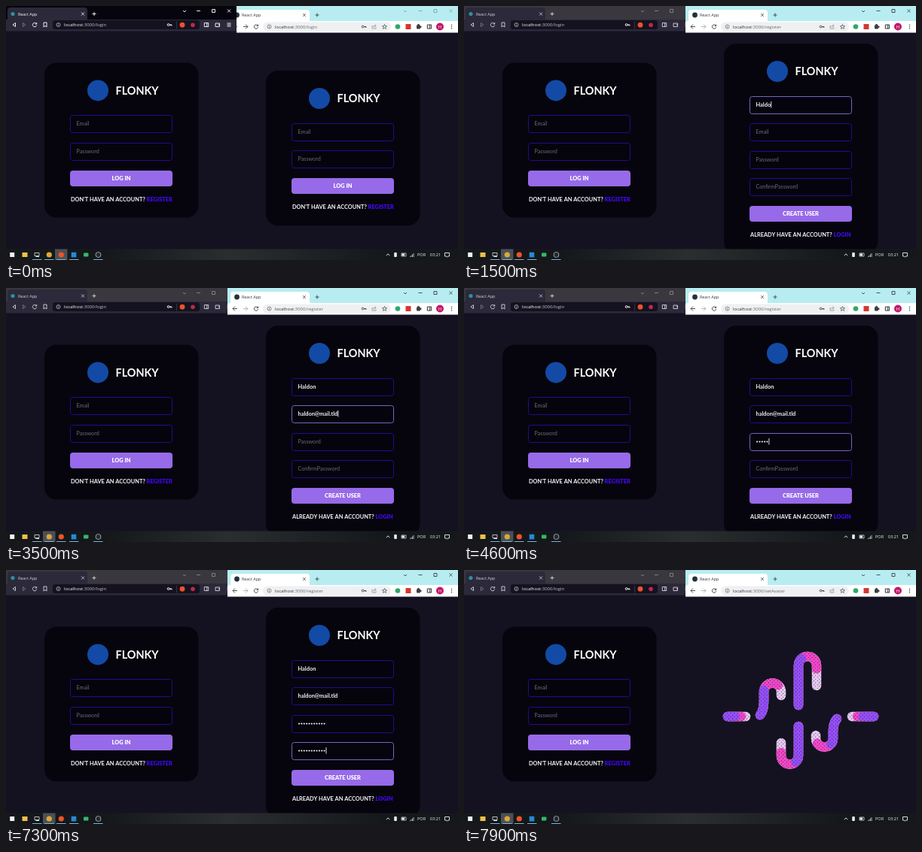
Write an HTML page with a canvas that moves like this. It is 600x338 px and loops after 8000 ms.

```html
<!DOCTYPE html>
<html lang="en">
<head>
<meta charset="utf-8">
<title>Sign up demo</title>
<style>
  html, body { margin: 0; width: 100%; height: 100%; overflow: hidden; background: #141221; }
  canvas { display: block; width: 600px; height: 338px; }
</style>
</head>
<body>
<canvas id="stage"></canvas>
<script>
const W = 600, H = 338, LOOP = 8000;
const canvas = document.getElementById('stage');
const ctx = canvas.getContext('2d');
const dpr = window.devicePixelRatio || 1;
canvas.width = W * dpr;
canvas.height = H * dpr;

const UI = '"Open Sans", "Noto Sans", sans-serif';
const FORM = 'Lato, "Open Sans", sans-serif';
const PAGE = '#141221', CARD = '#06050d', ACCENT = '#966ae8', LINK = '#4208f0', EDGE = '#27098f';
const BRAND = 'FLONKY', USER = 'Haldon', MAIL = 'haldon@mail.tld';

// Moments of the story, in ms
const SWITCH = 200, DONE = 7700;
const FOCUS = [400, 1800, 3900, 5500];

function box(x, y, w, h, fill, r = 0) {
  ctx.fillStyle = fill;
  ctx.beginPath();
  ctx.roundRect(x, y, w, h, r);
  ctx.fill();
}
function frame(x, y, w, h, color, r = 0, lw = 1) {
  ctx.strokeStyle = color;
  ctx.lineWidth = lw;
  ctx.beginPath();
  ctx.roundRect(x, y, w, h, r);
  ctx.stroke();
}
function disc(x, y, r, fill) {
  ctx.fillStyle = fill;
  ctx.beginPath();
  ctx.arc(x, y, r, 0, 7);
  ctx.fill();
}
function text(s, x, y, font, color, align = 'left') {
  ctx.font = font;
  ctx.fillStyle = color;
  ctx.textAlign = align;
  ctx.fillText(s, x, y);
}
// Small line icon, path given around (x, y)
function icon(d, x, y, color, lw = 0.9) {
  ctx.save();
  ctx.translate(x, y);
  ctx.strokeStyle = color;
  ctx.lineWidth = lw;
  ctx.stroke(new Path2D(d));
  ctx.restore();
}

const I = {
  back: 'M3 0H-3M0 -3L-3 0L0 3',
  next: 'M-3 0H3M0 -3L3 0L0 3',
  prevTri: 'M1.5 -2.5L-2 0L1.5 2.5Z',
  nextTri: 'M-1.5 -2.5L2 0L-1.5 2.5Z',
  reload: 'M2.4 -1.3A2.7 2.7 0 1 0 2.7 .6M2.7 -3V-1H.7',
  mark: 'M-2 -3H2V3L0 1.4L-2 3Z',
  info: 'M2.5 0A2.5 2.5 0 1 1 -2.5 0A2.5 2.5 0 1 1 2.5 0M0 -.4V1.5M0 -1.6V-1',
  key: 'M0 0A1.4 1.4 0 1 1 -2.8 0A1.4 1.4 0 1 1 0 0H3V1.4M1.6 0V1.2',
  share: 'M-1 -1H-2.5V2.5H2.5V.5M-.5 1Q-.5 -1.5 2.5 -1.5M1 -3L2.7 -1.5L1 0',
  star: 'M0 -3L.9 -.9L3 -.8L1.4 .6L1.9 2.8L0 1.6L-1.9 2.8L-1.4 .6L-3 -.8L-.9 -.9Z',
  panel: 'M-2.7 -2.5H2.7V2.5H-2.7ZM.7 -2.5V2.5',
  wallet: 'M-3 -2H2.5V2.5H-3ZM.5 0H3',
  menu: 'M-2.5 -2H2.5M-2.5 0H2.5M-2.5 2H2.5',
  plus: 'M-2.5 0H2.5M0 -2.5V2.5',
  cross: 'M-2 -2L2 2M2 -2L-2 2',
  min: 'M-2.5 0H2.5',
  max: 'M-2 -2H2V2H-2Z',
  down: 'M-2 -1L0 1L2 -1',
  up: 'M-2.2 1.2L0 -1.2L2.2 1.2'
};

function typed(s, start, step, t) {
  const n = t < start ? 0 : Math.floor((t - start) / step) + 1;
  return s.slice(0, n);
}

function field(x, y, hint, value, secret, focused) {
  box(x, y, 136, 24, '#05040c', 3);
  frame(x + 0.5, y + 0.5, 135, 23, focused ? '#7c60c4' : EDGE, 3);
  const tx = x + 8.5, base = y + 14;
  let end = tx;
  if (!value) {
    text(hint, tx, base, '7.2px ' + FORM, '#6d6a76');
  } else if (secret) {
    for (let i = 0; i < value.length; i++) disc(tx + 1.6 + i * 3.35, y + 11.5, 1.1, '#f2f0f6');
    end = tx + value.length * 3.35;
  } else {
    text(value, tx, base, 'bold 7.4px ' + FORM, '#f4f2f8');
    end = tx + ctx.measureText(value).width;
  }
  if (focused) box(end + 0.2, y + 7, 0.9, 8.5, '#f2f0f6');
}

// fields: [hint, value, secret]; active is the focused index
function card(x, y, fields, active, action, ask, link) {
  const n = fields.length, step = 36.4, left = Math.floor(x + 34.5);
  box(x, y, 204.5, 133 + 36.6 * n, CARD, 16);
  disc(x + 71, y + 37, 14, '#124aa6');
  text(BRAND, x + 94.5, y + 42.2, 'bold 14.4px ' + FORM, '#fff');
  fields.forEach((f, i) => field(left, Math.round(y + 70 + step * i), f[0], f[1], f[2], i === active));
  const by = Math.round(y + 70.5 + step * n);
  box(left, by, 136, 21, ACCENT, 4);
  text(action, x + 102, by + 13, '900 7.4px ' + FORM, '#fff', 'center');
  const ty = by + 40.6;
  text(ask, x + 35, ty, 'bold 7.4px ' + FORM, '#f7f6fa');
  const w = ctx.measureText(ask + ' ').width;
  text(link, x + 35 + w, ty, '900 7.4px ' + FORM, LINK);
}

function loginCard(x, y) {
  card(x, y, [['Email', ''], ['Password', '']], -1, 'LOG IN', "DON'T HAVE AN ACCOUNT?", 'REGISTER');
}

function registerCard(t) {
  const secret = 'x'.repeat(11);
  const fields = [
    ['Username', typed(USER, 900, 130, t)],
    ['Email', typed(MAIL, 2000, 105, t)],
    ['Password', typed(secret, 4200, 90, t), true],
    ['ConfirmPassword', typed(secret, 5850, 100, t), true]
  ];
  const active = FOCUS.filter(f => t >= f).length - 1;
  card(345, 50, fields, active, 'CREATE USER', 'ALREADY HAVE AN ACCOUNT?', 'LOGIN');
}

// Loader ribbons: path, full length, pink length, purple length
const RIBBONS = [
  ['M350 195H374', 24, 18, 10],
  ['M393 193C399 186 398 176 398 162A11.5 11.5 0 0 1 421 162V167', 73, 58, 34],
  ['M444 180V127A12 12 0 0 1 468 127V154', 118, 95, 63],
  ['M444 208V247A11.5 11.5 0 0 1 421 247V230', 92, 79, 48],
  ['M495 198C489 205 490 214 490 224A11.5 11.5 0 0 1 467 224V220', 67, 56, 35],
  ['M544 195H515', 29, 22, 14]
].map(([d, ...len]) => ({ path: new Path2D(d), len }));
const TINTS = ['#e4c9ee', '#ee48c6', '#934ff6'];

function speckle() {
  const tile = document.createElement('canvas');
  tile.width = tile.height = 16;
  const c = tile.getContext('2d');
  c.fillStyle = 'rgba(35,15,60,.7)';
  for (const [x, y] of [[4, 4], [12, 12]]) {
    c.beginPath();
    c.arc(x, y, 1.9, 0, 7);
    c.fill();
  }
  const p = ctx.createPattern(tile, 'repeat');
  p.setTransform(new DOMMatrix().scale(0.3));
  return p;
}
const DOTS = speckle();

function loader(t) {
  const grow = Math.min(1, 0.75 + (t - DONE) / 200 * 0.25);
  ctx.save();
  ctx.lineCap = 'round';
  ctx.lineWidth = 12.5;
  for (const { path, len } of RIBBONS) {
    const paint = (style, l) => {
      ctx.strokeStyle = style;
      ctx.setLineDash([l * grow, 999]);
      ctx.stroke(path);
    };
    TINTS.forEach((c, i) => paint(c, len[i]));
    paint(DOTS, len[0]);
  }
  ctx.restore();
}

function address(path, x, y, hostColor, pathColor) {
  const font = '6px ' + UI;
  text('localhost', x, y, font, hostColor);
  const w = ctx.measureText('localhost').width;
  text(':3000/' + path, x + w, y, font, pathColor);
}

function leftWindow(front) {
  const ink = front ? '#fff' : '#d6d4dc', dim = front ? '#fff' : '#88858e';
  const bar = '#2b293a';
  box(0, 0, 306, 324, PAGE);
  box(0, 0, 306, 20, front ? '#06050d' : '#3a383e');
  box(2, 2, 106, 20, bar, [4, 4, 0, 0]);
  box(0, 18, 306, 15.5, bar);
  disc(9, 10.5, 2.6, '#2f8fa0');
  text('React App', 16, 12.6, '500 5.4px ' + UI, ink);
  icon(I.cross, 102, 10.5, ink, 0.8);
  icon(I.plus, 117, 10.5, ink);
  icon(I.down, 237, 7, dim);
  icon(I.min, 255.5, 6.5, dim);
  icon(I.max, 275.5, 6.5, dim);
  icon(I.cross, 296, 6.5, dim);

  icon(I.prevTri, 11, 25, ink);
  icon(I.nextTri, 24, 25, '#77748a');
  icon(I.reload, 38, 25, ink);
  icon(I.mark, 52, 25, ink);
  box(62, 19, 195, 12, '#14121f', 3);
  icon(I.info, 69.5, 25, '#d5d3de', 0.7);
  address('login', 77, 27, '#fff', '#c3c1ce');
  icon(I.key, 217, 25, '#f2f1f6', 1);
  box(226, 20.5, 0.7, 10, '#44415a');
  disc(234, 25.2, 3.4, '#f0502a');
  disc(248, 25.2, 2.8, '#c0284a');
  icon(I.panel, 266, 25, ink);
  icon(I.wallet, 281, 25, ink);
  icon(I.menu, 296, 25, ink);
  loginCard(51, 75.4);
}

function rightWindow(t) {
  const front = t >= SWITCH;
  const path = !front ? 'login' : t < DONE ? 'register' : 'setAvatar';
  const ink = '#3c3f43', dim = front ? ink : '#7fa3a8';
  box(294, 0, 306, 324, PAGE);
  box(294, 0, 306, 20, '#b7edf1');
  box(298, 5, 105, 18, '#fff', [4, 4, 0, 0]);
  box(294, 20, 306, 15.4, '#fff');
  disc(306.5, 12, 3.4, '#20323c');
  text('React App', 313, 14, '500 5.4px ' + UI, '#33363a');
  icon(I.cross, 396, 12, ink, 0.7);
  icon(I.plus, 413, 12, ink);
  icon(I.down, 530, 7, dim);
  icon(I.min, 550, 6.5, dim);
  icon(I.max, 570, 6.5, dim);
  icon(I.cross, 590.5, 6.5, dim);

  icon(I.back, 304, 27.5, ink);
  icon(I.next, 318, 27.5, front ? '#a9acb0' : ink);
  icon(I.reload, 332, 27.5, ink);
  box(341, 21.5, 170, 12, '#eef0f2', 6);
  icon(I.info, 349.5, 27.5, '#5b5e62', 0.7);
  address(path, 357, 29.5, '#2c2e31', '#66696d');
  icon(I.key, 475, 27.5, ink);
  icon(I.share, 488.5, 27.5, '#85888c', 0.7);
  icon(I.star, 502.5, 27.5, ink, 0.7);
  disc(520, 27.5, 3.3, '#2fa866');
  box(530.5, 24, 7, 7, '#d5362f');
  box(545, 25.2, 5, 5.2, '#3c3f43', 1);
  disc(547.5, 25, 1.3, '#3c3f43');
  disc(550.3, 27.8, 1.3, '#3c3f43');
  icon(I.panel, 562, 27.5, '#303236', 1);
  disc(576, 27.5, 5, '#c2186b');
  text('H', 576, 29.7, '6px ' + UI, '#fff', 'center');
  for (let i = -1; i < 2; i++) disc(591.5, 27.5 + i * 2.2, 0.7, ink);

  if (!front) loginCard(345, 86);
  else if (t < DONE) registerCard(t);
  else loader(t);
}

function taskbar(front) {
  const y = 331;
  const shade = ctx.createLinearGradient(130, 0, 500, 0);
  shade.addColorStop(0, '#14181b');
  shade.addColorStop(0.45, '#2b2e2f');
  shade.addColorStop(1, '#14181b');
  box(0, 323.5, W, 15, shade);
  box(front ? 65 : 49, 323.5, 16.5, 14.5, '#4a5156');
  box(5.2, 328, 6, 6, '#f0f2f4');
  box(21.5, 328, 7, 6, '#f0c04c');
  frame(38, 328.5, 6, 4, '#dfe3e6', 0, 0.8);
  box(39.5, 333, 4.5, 1, '#dfe3e6');
  disc(57.3, y, 3.6, '#e0a53a');
  disc(73.3, y, 3.6, '#ef5228');
  box(86.7, 327.8, 6.6, 6.6, '#258ad6');
  box(103, 328.5, 6.4, 5, '#35b86d', 1);
  disc(122.5, y, 3.8, '#a6abb0');
  disc(122.5, y, 2.9, '#24282c');
  for (const x of [41, 57, 73, 90, 122]) box(x - 6, 337, 12.5, 1, '#78b6dd');

  const ink = '#eef0f2';
  icon(I.up, 507, y, ink);
  box(515.2, 328, 3.6, 6, ink, 1);
  frame(525, 329, 6, 4, ink, 0, 0.7);
  box(525.5, 329.5, 3.6, 3, ink);
  for (let i = 0; i < 4; i++) box(536 + i * 1.5, 333 - i * 1.3, 1, 1 + i * 1.3, '#a7adb2');
  text('POR', 551.5, 333.2, '500 5.6px ' + UI, ink, 'center');
  text('03:21', 570, 333.2, '500 5.6px ' + UI, ink, 'center');
  icon('M-3 -2.5H3V2H1L0 3.2L-1 2H-3Z', 585.5, y, ink);
}

function draw(now) {
  const t = now % LOOP, front = t < SWITCH;
  ctx.setTransform(dpr, 0, 0, dpr, 0, 0);
  if (front) {
    rightWindow(t);
    leftWindow(true);
  } else {
    leftWindow(false);
    rightWindow(t);
  }
  taskbar(front);
}

const begin = performance.now();
function tick() {
  draw(performance.now() - begin);
  requestAnimationFrame(tick);
}
tick();
</script>
</body>
</html>
```
